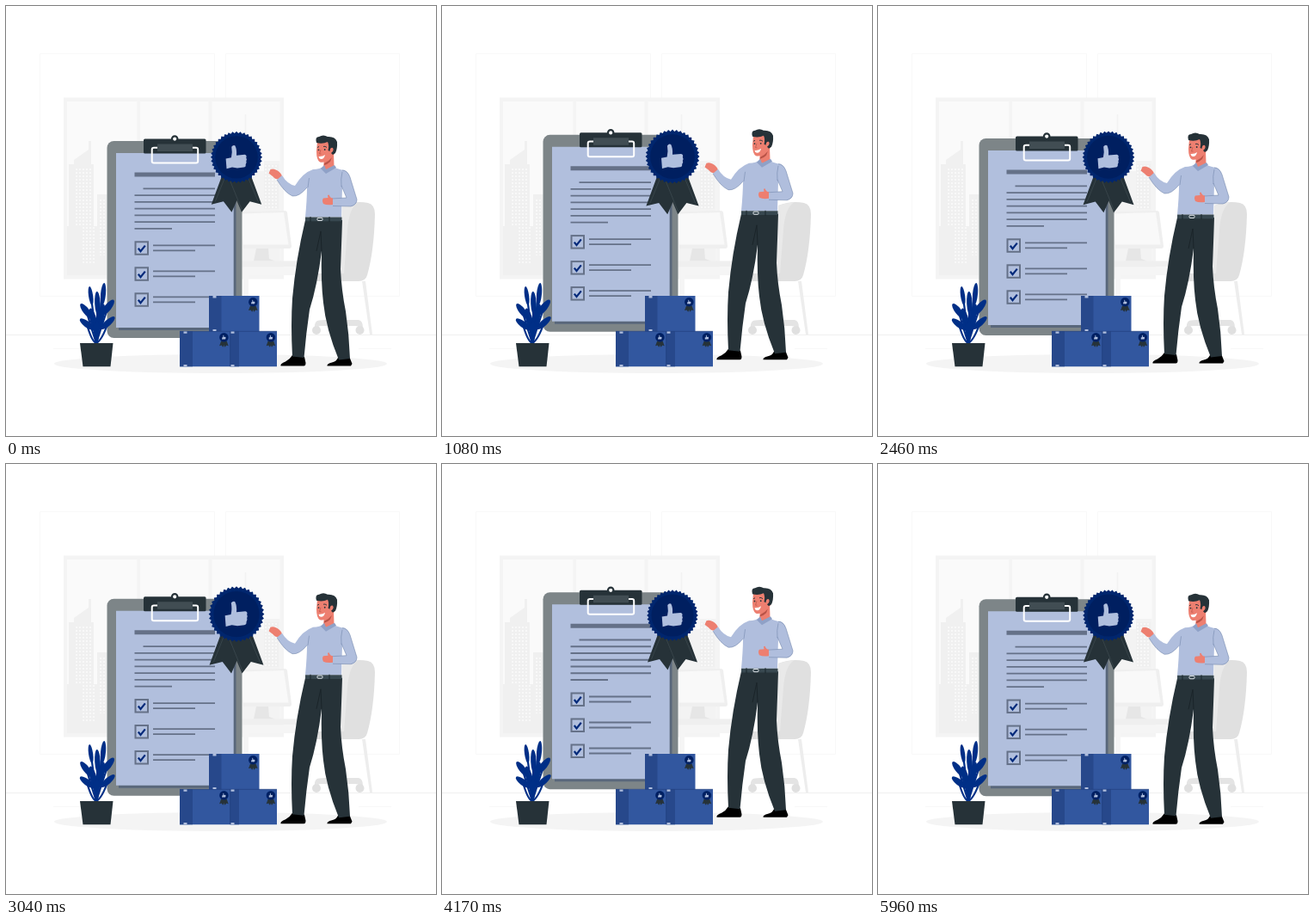
An HTML page for the animation above (6 s loop, 500 by 500 pixels).

```html
<!DOCTYPE html>
<html lang="en">
<head>
<meta charset="utf-8">
<title>Quality checklist</title>
<style>
html, body { margin: 0; width: 100%; height: 100%; overflow: hidden; background: #fff; }
svg { display: block; width: 100vw; height: 100vh; }
</style>
</head>
<body>
<svg viewBox="0 0 500 500">
  <defs>
    <pattern id="panes" width="4" height="4" patternUnits="userSpaceOnUse">
      <rect width="4" height="4" fill="#f0f0f0"/>
      <path d="M1 1h2v2H1z" fill="#f8f8f8"/>
    </pattern>
    <g id="award">
      <path d="M251 198L239 230.500L253 227L262.500 239.500L278 204Z" fill="#263238"/>
      <path d="M285 198L297 230.500L283.500 227L274 239.500L259 204Z" fill="#263238"/>
      <path d="M254 201L243.500 227M282 201L293 227M261 204L274 236" fill="none" stroke="#3e4b51" stroke-width=".7"/>
      <path id="burst" fill="#00266e"/>
      <circle cx="268" cy="176" r="24.500" fill="#001f60"/>
      <path d="M255.700 177.600L262 176.400Q263.500 171 262.300 164Q264 161.500 266.300 162.600Q268.600 167 268 173.800L277.500 173Q280.300 173.700 279.200 176.600Q280.500 178.500 279.200 180.400Q280.200 182.500 278.600 184.200Q279 187.300 276.500 187.600L269 188.600L263 187.600L256.600 189.300Z" fill="#b0bfde"/>
    </g>
  </defs>

  <!-- room -->
  <g fill="none" stroke="#f8f8f8">
    <path d="M39.500 55.500H242.500V337.500H39.500ZM255.500 55.500H457.500V337.500H255.500Z"/>
    <path d="M0 382.500H500" stroke="#f0f0f0"/>
    <path d="M55 398.500H90M410 398.500H448" stroke="#f8f8f8"/>
  </g>
  <path d="M67 106.500H323V317.500H67Z" fill="#f4f4f4"/>
  <path d="M71 111H152.500V313H71ZM156 111H235.500V313H156ZM239.500 111H318.500V313H239.500Z" fill="#fafafa"/>
  <g fill="#f0f0f0">
    <path d="M71 256H73V184H79V179L96 167V157H99V184H102V256H106V219H117.500V313H71Z"/>
    <path d="M277.500 126H279.500V150L290 170V192H300V180H318.500V313H270V160H277.500Z" fill="#f3f3f3"/>
  </g>
  <path d="M80 187H101V255H80ZM88 256H104V300H88ZM107 223H117V290H107ZM300 184H317V236H300Z" fill="url(#panes)"/>

  <!-- desk, monitor and chair -->
  <path d="M272 239.500L324 238Q326.500 238 327 240L332 279Q332 282 329.500 282H276Z" fill="#efefef"/>
  <path d="M272 241.500L323 240L328.500 277.500H276Z" fill="#f9f9f9"/>
  <path d="M291 282H305L306 294L313 296.500H288Z" fill="#e6e6e6"/>
  <path d="M270 296.500H341V303.500H270Z" fill="#efefef"/>
  <path d="M276 303.500H336V313H282V337H276Z" fill="#f5f5f5"/>
  <path d="M391 232Q407 226 421 229Q429 231 429 242Q428 285 420 313Q418 320 410 320H355V311H389Z" fill="#e0e0e0"/>
  <path d="M391 232Q400 228.500 409 228.500Q399 235 397 260L393 311H389Z" fill="#e9e9e9"/>
  <path d="M414 320H418L426 382H423Z" fill="#ededed"/>
  <path d="M384 320H390V365H410Q415 366 415 374H411Q410 372 406 372H365Q363 372 363 375H359Q358 366 364 365.500L384 364Z" fill="#e4e4e4"/>
  <g fill="#e0e0e0">
    <circle cx="361" cy="377" r="5"/><circle cx="411.500" cy="377" r="5"/><circle cx="389" cy="378" r="4"/>
  </g>
  <ellipse cx="249.500" cy="416" rx="193.500" ry="11" fill="#f4f4f4"/>

  <g class="float">
    <!-- man -->
    <path d="M333 406L347 408L348.500 415Q348.500 418.700 346 418.500H319.500Q318.500 416 325 413.500Q330 411 333 406ZM386 409L399.500 408.500L402.500 416L401 418.500H373.500Q373 416 379 414.500Q384 413.500 386 409Z"/>
    <path d="M348 249H391Q390 280 389 306Q390 330 395 355Q399 382 400 410L387 411.500Q372 375 369 345Q366 320 367 285Q362 325 353 353Q349 380 346.500 409L333 407.500Q331 370 333 340Q337 295 348 249Z" fill="#263238"/>
    <path d="M367 285L366 262L361 285" fill="none" stroke="#1a2429"/>
    <path d="M320 201Q314 203 310 198L305.500 194.500L307.500 190Q311 188.500 315 191Q320 194 321 198Z" fill="#ed7f70"/>
    <path d="M357 190Q365 190 370 186L381 187Q386 190 394 191L391 211L390 245.500H348Q350 225 350 211Q341 222 333 221Q324 217 315 202L321 197Q327 207 336 209Q345 194 357 190Z" fill="#b0bedd"/>
    <path d="M391 191Q397 190 400 199L408 225Q408 231 402 233L380 232.500L378 224L396 223L390 209Z" fill="#b0bedd"/>
    <path d="M351 211L352.500 200M390 210Q389 201 391 193M390 209L396 223L379 224M380 232.500L401 233Q408 231 408 225L400 199Q397 191 391 191M315 202Q324 217 333 221Q341 222 350 211" fill="none" stroke="#7588ae" stroke-width=".6"/>
    <path d="M380 223.500Q377 223.500 375.500 219.500L374 220L374.500 223L369 223.500Q367 226 369 230Q373 232 380 231Z" fill="#ed7f70"/>
    <path d="M370 177L381 170L381.500 187Q374 193 369 188Z" fill="#ed7f70"/>
    <path d="M370 183Q376 180 379 176L377 181Q374 184 370 185Z" fill="#b95347"/>
    <path d="M366 189L370 185L372 190L382 185L384 188L372 195Z" fill="#8fa1c7"/>
    <path d="M362 158L361 169Q361 179 365 181.500Q371 183 376 177Q379 174 382 172L381 158Z" fill="#ed7f70"/>
    <path d="M361 159Q359 152 364 152Q369 149 374 152Q383 151.500 385 158Q385.500 166 383 171L380 173L378 171Q382 168 380 165Q377 164 376.500 169L374.500 168Q376 162 374 158Q368 161 361 159Z" fill="#263238"/>
    <path d="M363.500 175Q368 175.500 371 173Q370 178 366.500 178Q364 178 363.500 175Z" fill="#fff"/>
    <path d="M362 164.500L364 163.500M369 163.500Q371 162.500 373 164.500" fill="none" stroke="#263238" stroke-width=".9"/>
    <circle cx="363.500" cy="167.300" r=".9" fill="#263238"/><circle cx="370.700" cy="167" r=".9" fill="#263238"/>
    <path d="M366 167L364.500 172L366.500 172" fill="none" stroke="#b95347" stroke-width=".7"/>
    <path d="M348 245.500H390.500V250.300H348Z" fill="#37474f"/>
    <path d="M354 245V251M376 245V251" stroke="#1b272d"/>
    <rect x="362" y="246.300" width="6" height="3.200" rx="1" fill="none" stroke="#dfe4e8" stroke-width="1"/>

    <!-- clipboard -->
    <rect x="117.500" y="157" width="157" height="229" rx="8" fill="#7d8588"/>
    <path d="M131 174H267.500V377H131Z" fill="#59677b"/>
    <path d="M128 171H264.700V374H128Z" fill="#b1bfdd"/>
    <rect x="160" y="154.500" width="72.500" height="17" rx="1.500" fill="#263238"/>
    <circle cx="196.200" cy="154.600" r="3.200" fill="#fff" stroke="#263238" stroke-width="2.200"/>
    <path d="M176 160.500H217V169H176Z" fill="#414d53"/>
    <path d="M176 164.800H172Q169.700 164.800 169.700 167V180.500Q169.700 182.500 172 182.500H221Q223.200 182.500 223.200 180.500V167Q223.200 164.800 221 164.800H217" fill="none" stroke="#fff" stroke-width="2"/>
    <g id="lines" fill="none" stroke="#657188" stroke-width="1.800">
      <path d="M149.500 196H243" stroke-width="5"/>
    </g>
  </g>

  <g id="pulse"><use href="#award"/></g>

  <!-- boxes -->
  <path d="M236 337H294.500V378.500H236ZM202 378.300H315V419.300H202Z" fill="#32579f"/>
  <path d="M236 337H250.500V378.300H236ZM202 378.300H217V419.300H202ZM260.500 378.300H271V419.300H260.500Z" fill="#27488b"/>
  <path d="M202 378.300H315M260.700 378.300V419" stroke="#213f7e" stroke-width=".7"/>
  <path d="M240.500 337h4v2.500h-4zM240.500 376h4v2h-4zM206.500 378.500h4v2.300h-4zM206.500 417h4v2.300h-4zM261.500 378.500h4v2.300h-4zM261.500 417h4v2.300h-4z" fill="#b0bedd"/>
  <g id="seals"></g>

  <!-- plant -->
  <g id="plant" fill="#002f87" stroke="#002f87"></g>
  <path d="M86 392H124.500L121.500 419.300H89.500Z" fill="#263238"/>
</svg>
<script>
const $ = s => document.querySelector(s);

const teeth = 40;
let outline = '';
for (let i = 0; i < teeth * 2; i++) {
  const a = i * Math.PI / teeth, r = i % 2 ? 27.7 : 29.8;
  outline += `${i ? 'L' : 'M'}${268 + r * Math.sin(a)} ${176 - r * Math.cos(a)}`;
}
$('#burst').setAttribute('d', outline + 'Z');

let rows = '';
for (let i = 0; i < 7; i++)
  rows += `<path d="M${i ? 149.5 : 159.5} ${212.3 + i * 7.75}H${i < 6 ? 243 : 193}"/>`;
for (let i = 0; i < 3; i++) {
  const y = 278.3 + i * 30;
  rows += `<path d="M171 ${y}H243M171 ${y + 6}H220"/>
    <rect x="150.500" y="${y - 4}" width="14.500" height="14.500" stroke-width="2"/>
    <path d="M153.800 ${y + 3.5}l2.700 3.400l5.300-6.600" stroke="#00297a" stroke-width="2.200"/>`;
}
$('#lines').innerHTML += rows;

$('#seals').innerHTML = [[287.3, 344.2], [253.4, 385.3], [307.9, 385.3]].map(([x, y]) =>
  `<use href="#award" transform="translate(${x} ${y}) scale(.182) translate(-268 -176)"/>`).join('');

// leaf centre, half width, half length, tilt
const leaves = [
  [113, 335, 3, 13, 5], [98.6, 337, 2.6, 11, -8], [106.5, 346, 3.3, 14, -3], [118.5, 350.5, 4, 11, 38],
  [93.5, 355, 3.7, 11, -38], [94, 370, 3.6, 10, -53], [118.5, 368.5, 3.6, 10.5, 48], [102, 367, 4, 16, -14], [109.5, 364, 4, 18, 13]
];
$('#plant').innerHTML = leaves.map(([x, y, rx, ry, tilt]) =>
  `<ellipse cx="${x}" cy="${y}" rx="${rx}" ry="${ry}" transform="rotate(${tilt} ${x} ${y})" stroke="none"/>
   <path d="M${x} ${y}Q${(x + 105) / 2} ${y + 20} 105 392" fill="none" stroke-width="2.200"/>`).join('') +
  '<path d="M100 374Q104 381 104 393H107Q107 381 111 374L106 366Z" stroke="none"/>';

// piecewise linear heartbeat: [fraction of loop, scale]
const beat = [[0, 1], [.1, 1.1], [.3, 1], [.4, 1], [.5, 1.1], [.6, 1], [1, 1]];
function beatScale(p) {
  const i = beat.findIndex(k => k[0] > p);
  const [p0, s0] = beat[i - 1], [p1, s1] = beat[i];
  return s0 + (s1 - s0) * (p - p0) / (p1 - p0);
}

const floater = $('.float'), pulse = $('#pulse');
const start = performance.now();
function draw() {
  const t = (performance.now() - start + 45) % 6000;
  const lift = 10 * (1 - Math.abs(1 - t % 3000 / 1500));
  floater.setAttribute('transform', `translate(0 ${.3 - lift})`);
  pulse.setAttribute('transform', `translate(268 192.700) scale(${beatScale(t / 6000)}) translate(-268 -192.700)`);
  requestAnimationFrame(draw);
}
draw();
</script>
</body>
</html>
```
